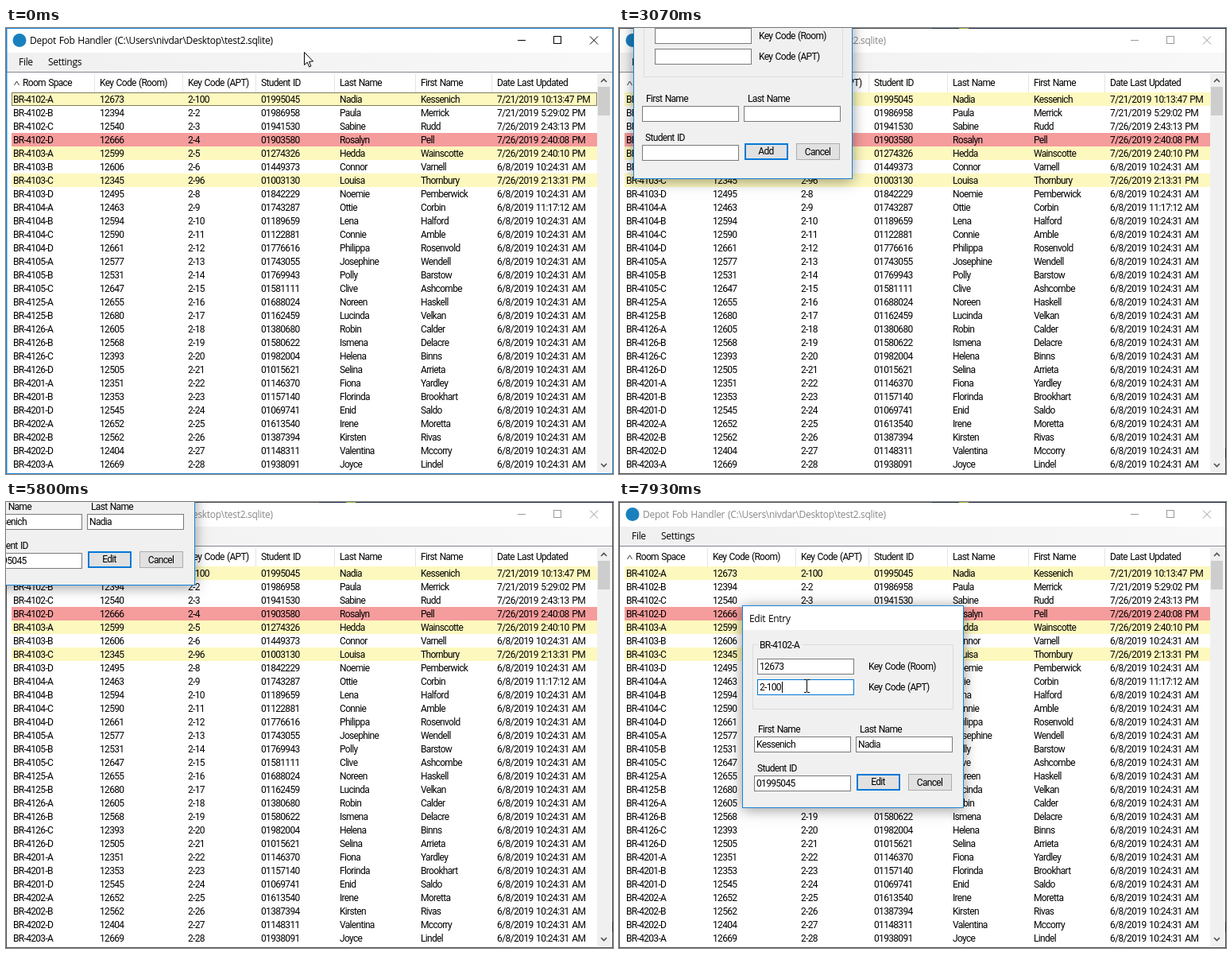
Animation, 764 px wide and 561 px high, one loop 8000 ms. Source, as an HTML page with a canvas:

```html
<!DOCTYPE html>
<html lang="en">
<head>
<meta charset="utf-8">
<title>Key list</title>
<style>
html, body { margin: 0; width: 100%; height: 100%; overflow: hidden; background: #fff; }
canvas { display: block; }
</style>
</head>
<body>
<canvas id="stage" width="764" height="561"></canvas>
<script>
const ctx = document.getElementById('stage').getContext('2d');
const W = 764, H = 561, LOOP = 8000;
const BLUE = '#0078d7', EDGE_BLUE = '#1883d7';
const GRID_FONT = '12px Roboto, sans-serif';
const UI_FONT = '12px "Open Sans", "Noto Sans", sans-serif';
const TITLE = 'Depot Fob Handler (C:\\Users\\nivdar\\Desktop\\test2.sqlite)';
const USUAL_DATE = '6/8/2019 10:24:31 AM';

const COLUMNS = [
  [9, ''], [118, 'Key Code (Room)'], [229, 'Key Code (APT)'], [321, 'Student ID'],
  [420, 'Last Name'], [522, 'First Name'], [618, 'Date Last Updated']
];
const DIVIDERS = [111, 222, 314, 413, 515, 611];
const ROWS = `4102-A 12673 01995045 Nadia Kessenich
4102-B 12394 01986958 Paula Merrick
4102-C 12540 01941530 Sabine Rudd
4102-D 12666 01903580 Rosalyn Pell
4103-A 12599 01274326 Hedda Wainscotte
4103-B 12606 01449373 Connor Varnell
4103-C 12345 01003130 Louisa Thornbury
4103-D 12495 01842229 Noemie Pemberwick
4104-A 12463 01743287 Ottie Corbin
4104-B 12594 01189659 Lena Halford
4104-C 12590 01122881 Connie Amble
4104-D 12661 01776616 Philippa Rosenvold
4105-A 12577 01743055 Josephine Wendell
4105-B 12531 01769943 Polly Barstow
4105-C 12647 01581111 Clive Ashcombe
4125-A 12655 01688024 Noreen Haskell
4125-B 12680 01162459 Lucinda Velkan
4126-A 12605 01380680 Robin Calder
4126-B 12568 01580622 Ismena Delacre
4126-C 12393 01982004 Helena Binns
4126-D 12505 01015621 Selina Arrieta
4201-A 12351 01146370 Fiona Yardley
4201-B 12353 01157140 Florinda Brookhart
4201-D 12545 01069741 Enid Saldo
4202-A 12652 01613540 Irene Moretta
4202-B 12562 01387394 Kirsten Rivas
4202-D 12404 01148311 Valentina Mccorry
4203-A 12669 01938091 Joyce Lindel`.split('\n').map(line => line.split(' '));
const DATES = {
  0: '7/21/2019 10:13:47 PM', 1: '7/21/2019 5:29:02 PM', 2: '7/26/2019 2:43:13 PM',
  3: '7/26/2019 2:40:08 PM', 4: '7/26/2019 2:40:10 PM', 6: '7/26/2019 2:13:31 PM',
  8: '6/8/2019 11:17:12 AM'
};
const APARTMENTS = { 0: '2-100', 6: '2-96' };
const YELLOW = '#fdf8be', RED = '#f59c9c';
const ROW_FILL = { 0: YELLOW, 3: RED, 4: YELLOW, 6: YELLOW };
const MENU = ['New Entry', 'Import Keys', 'Export Keys', 'Refresh', 'Exit'];

// Keys are [time, x, y]
const POINTER = [
  [200, 375, 30], [530, 130, 72], [720, 3, 58], [930, 28, 44],
  [1130, 28, 44], [1500, 34, 48], [1540, 34, 48], [1730, 60, 63],
  [1860, 60, 63], [2130, 54, 61], [2700, 54, 61], [2930, -14, 61],
  [2940, -14, -49], [3060, 112, -49], [3090, 112, -49], [3600, 249, 159],
  [3870, 335, 300], [3920, 335, 300], [4130, 388, 363], [4200, 388, 363],
  [4580, 124, 129], [4610, 124, 129], [4730, 112, 116], [4790, 112, 116],
  [5070, 84, 88], [5630, 84, 88], [5790, -13, 66], [5960, -6, 32], [6130, -14, 5],
  [6140, -14, -40], [6240, 57, -132], [6250, 57, -132], [6640, 253, 148], [6690, 253, 148],
  [7070, 250, 212], [7120, 250, 212], [7340, 238, 240], [7530, 236, 231]
];
const MENU_OPEN = 1120, MENU_CLOSE = 2190, FIELD_CLICK = 7520;
const ADD = {
  title: 'Add Entry', action: 'Add', open: 2320, close: 4190,
  path: [[3090, 14, -67], [3600, 151, 141]], left: 4, width: 276, height: 257
};
const EDIT = {
  title: 'Edit Entry', action: 'Edit', open: 5260, close: Infinity,
  path: [[6250, -41, -150], [6640, 155, 130]], left: 0, width: 279, height: 255
};

const clamp = v => Math.max(0, Math.min(1, v));
const fade = (t, from, to, span) => Math.min(clamp((t - from) / span), 1 - clamp((t - to) / span));

function along(keys, t) {
  let a = keys[0];
  for (const b of keys) {
    if (t < b[0]) {
      if (a === b) break;
      const u = clamp((t - a[0]) / (b[0] - a[0]));
      const k = u * u * (3 - 2 * u);
      return [a[1] + (b[1] - a[1]) * k, a[2] + (b[2] - a[2]) * k].map(Math.round);
    }
    a = b;
  }
  return [a[1], a[2]];
}

function fill(x, y, w, h, color) {
  ctx.fillStyle = color;
  ctx.fillRect(x, y, w, h);
}

function frame(x, y, w, h, color) {
  ctx.strokeStyle = color;
  ctx.lineWidth = 1;
  ctx.strokeRect(x + .5, y + .5, w - 1, h - 1);
}

function lines(points, color, width = 1) {
  ctx.strokeStyle = color;
  ctx.lineWidth = width;
  ctx.beginPath();
  points.forEach(([x, y], i) => i ? ctx.lineTo(x, y) : ctx.moveTo(x, y));
  ctx.stroke();
}

function text(str, x, y, { font = GRID_FONT, color = '#000', spacing = -.68, align = 'left' } = {}) {
  ctx.font = font;
  ctx.letterSpacing = spacing + 'px';
  ctx.wordSpacing = '1px';
  ctx.textAlign = align;
  ctx.fillStyle = color;
  ctx.fillText(str, x, y);
}

const uiText = (str, x, y, color = '#000') => text(str, x, y, { font: UI_FONT, color, spacing: -.3 });

function drawTitleBar(active) {
  const ink = active ? '#000' : '#999';
  ctx.fillStyle = '#1a80bd';
  ctx.beginPath();
  ctx.arc(17, 15.5, 8.5, 0, 7);
  ctx.fill();
  uiText(TITLE, 30, 20, active ? '#000' : '#888');
  fill(644, 15, 10, 1, ink);
  frame(689, 10, 10, 10, ink);
  lines([[735, 10.5], [745, 20.5]], ink);
  lines([[745, 10.5], [735, 20.5]], ink);
}

function drawMenuBar() {
  const g = ctx.createLinearGradient(0, 0, W, 0);
  g.addColorStop(0, '#f0f0f0');
  g.addColorStop(1, '#f8f8f8');
  fill(1, 31, W - 2, 24, g);
}

function drawList(active) {
  fill(1, 55, W - 2, 1, '#828790');
  for (const x of DIVIDERS) fill(x, 57, 1, 24, '#e5e5e5');
  COLUMNS.forEach(([x, label]) => text(label, x, 73));
  text('Room Space', 21, 73);
  lines([[10.5, 72], [13.5, 67], [16.5, 72]], '#333');

  ROWS.forEach(([room, key, id, last, first], i) => {
    const y = 81 + 17 * i;
    if (ROW_FILL[i]) fill(7, y, 737, 17, ROW_FILL[i]);
    const cells = ['BR-' + room, key, APARTMENTS[i] || '2-' + (i + 1), id, last, first, DATES[i] || USUAL_DATE];
    cells.forEach((cell, c) => text(cell, COLUMNS[c][0], y + 13, { spacing: c === 6 ? -.58 : -.68 }));
  });
  if (active) {
    ctx.setLineDash([1, 1]);
    frame(7, 81, 737, 17, '#000');
    ctx.setLineDash([]);
  }

  fill(744, 57, 17, 502, '#f0f0f0');
  fill(745, 74, 15, 36, '#cdcdcd');
  lines([[749, 68], [752.5, 64.5], [756, 68]], '#505050', 1.6);
  lines([[749, 548], [752.5, 551.5], [756, 548]], '#505050', 1.6);
}

function drawBorder(active) {
  frame(0, 0, W, H, active ? EDGE_BLUE : '#4a4d50');
  if (active) {
    fill(1, 1, 1, H - 2, 'rgba(24,131,215,.45)');
    return;
  }
  fill(394, 0, 370, 1, '#1b2945');
  fill(428, 0, 12, 1, '#9aac35');
  fill(763, 528, 1, 13, '#222');
}

function drawMenu(t, [px, py]) {
  const alpha = fade(t, MENU_OPEN, MENU_CLOSE, 130);
  const overFile = px >= 8 && px < 43 && py >= 33 && py < 53;
  if (alpha > 0) {
    fill(8, 33, 35, 20, '#fafafa');
    frame(7, 33, 37, 20, '#808080');
  } else if (overFile && t < MENU_OPEN) {
    fill(8, 33, 35, 20, '#b3d7f3');
    frame(8, 33, 35, 20, BLUE);
  }
  uiText('File', 16, 47);
  uiText('Settings', 53, 47);
  if (alpha <= 0) return;

  ctx.save();
  ctx.globalAlpha = alpha;
  for (let i = 1; i < 5; i++) fill(11, 56, 134 + i, 110 + i, 'rgba(0,0,0,.13)');
  fill(7, 52, 138, 114, '#fdfdfd');
  fill(8, 54, 26, 110, '#f6f6f6');
  frame(7, 52, 138, 114, '#808080');
  fill(8, 52, 35, 1, '#fafafa');
  MENU.forEach((item, i) => {
    const top = 54 + 22 * i;
    if (px > 8 && px < 143 && py >= top && py < top + 22) {
      fill(10, top, 132, 22, '#b3d7f3');
      frame(10, top, 132, 22, BLUE);
    }
    uiText(item, 43, top + 15);
  });
  ctx.restore();
}

function field(x, y, value, focused) {
  fill(x, y, 122, 20, '#fff');
  frame(x, y, 122, 20, focused ? BLUE : '#7a7a7a');
  text(value, x + 3, y + 14);
}

function button(x, label, isDefault) {
  fill(x, 212, 55, 21, '#e1e1e1');
  frame(x, 212, 55, 21, isDefault ? BLUE : '#adadad');
  if (isDefault) frame(x + 1, 213, 53, 19, BLUE);
  text(label, x + 27, isDefault ? 226 : 227, { align: 'center' });
}

function drawAddGroup() {
  frame(17, 36, 251, 93, '#dcdcdc');
  ['Room Space', 'Key Code (Room)', 'Key Code (APT)'].forEach((label, i) => {
    field(31, 41 + 26 * i, '', i === 0);
    text(label, 162, 55 + 26 * i);
  });
}

function drawEditGroup(t) {
  const clicked = t >= FIELD_CLICK;
  frame(13, 49, 253, 82, '#dcdcdc');
  fill(20, 48, 56, 3, '#f0f0f0');
  text('BR-4102-A', 22, 54);
  field(19, 67, '12673', !clicked);
  field(19, 93, '2-100', clicked);
  text('Key Code (Room)', 159, 81);
  text('Key Code (APT)', 159, 107);
  if (clicked) {
    fill(50, 96, 1, 14, '#000');
  } else {
    fill(21, 69, 32, 16, BLUE);
    text('12673', 22, 81, { color: '#fff' });
  }
}

function drawDialog(t, { title, action, open, close, path, left, width, height }) {
  const alpha = fade(t, open, close, 200);
  if (alpha <= 0) return;
  const [x, y] = along(path, t);
  const scale = .92 + .08 * alpha;
  const edit = action === 'Edit';

  ctx.save();
  ctx.globalAlpha = alpha;
  ctx.translate(x + 139, y + 127);
  ctx.scale(scale, scale);
  ctx.translate(-139, -127);
  ctx.shadowColor = 'rgba(0,0,0,.42)';
  ctx.shadowBlur = 16;
  ctx.shadowOffsetY = 2;
  fill(left, 0, width, height, '#f0f0f0');
  ctx.shadowColor = 'transparent';
  fill(left + 1, 1, width - 2, 30, '#fff');
  frame(left, 0, width, height, EDGE_BLUE);
  uiText(title, left + 9, 21);

  if (edit) drawEditGroup(t);
  else drawAddGroup();

  text('First Name', 20, 160);
  text('Last Name', 148, 160);
  field(15, 165, edit ? 'Kessenich' : '');
  field(143, 165, edit ? 'Nadia' : '');
  text('Student ID', 19, 209);
  field(15, 214, edit ? '01995045' : '');
  button(144, action, true);
  button(209, 'Cancel', false);
  ctx.restore();
}

function drawPointer(t, [x, y]) {
  const inField = t > 6690 && x > 174 && x < 296 && ((y > 197 && y < 217) || (y > 223 && y < 243));
  if (inField) {
    fill(x, y - 7, 1, 15, '#000');
    for (const end of [y - 8, y + 8]) {
      fill(x - 3, end, 3, 1, '#000');
      fill(x + 1, end, 3, 1, '#000');
    }
    return;
  }
  ctx.save();
  ctx.translate(x + .5, y + .5);
  ctx.beginPath();
  [[0, 0], [0, 16], [3.7, 12.6], [6.2, 18.4], [8.4, 17.5], [6, 11.8], [11, 11.4]]
    .forEach(p => ctx.lineTo(...p));
  ctx.closePath();
  ctx.fillStyle = '#fff';
  ctx.fill();
  ctx.strokeStyle = '#000';
  ctx.lineWidth = 1;
  ctx.stroke();
  ctx.restore();
}

function draw(t) {
  const active = t < ADD.open || (t >= ADD.close && t < EDIT.open);
  const pointer = along(POINTER, t);
  fill(0, 0, W, H, '#fff');
  drawTitleBar(active);
  drawMenuBar();
  drawList(active);
  drawBorder(active);
  drawMenu(t, pointer);
  drawDialog(t, ADD);
  drawDialog(t, EDIT);
  drawPointer(t, pointer);
}

const STEP = 1000 / 15;
function tick(now) {
  const t = now % LOOP;
  draw(Math.floor((t + 4) / STEP) * STEP);
  requestAnimationFrame(tick);
}
draw(0);
requestAnimationFrame(tick);
</script>
</body>
</html>
```
